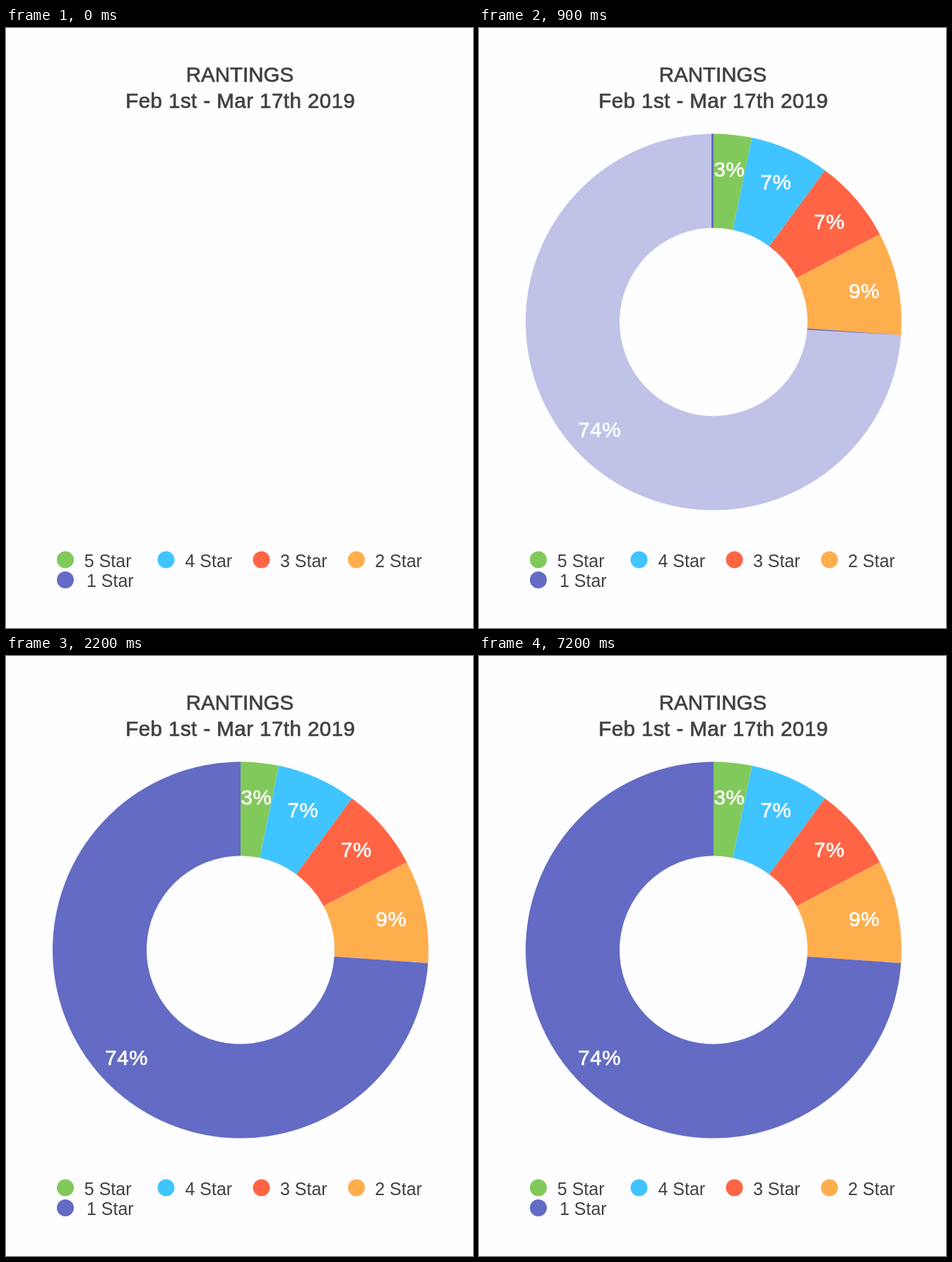
Animation, 661 px wide and 848 px high, one loop 7.3 s. Source, as an HTML page:

```html
<!DOCTYPE html>
<html lang="en">
<head>
<meta charset="utf-8">
<title>Rantings</title>
<style>
  html, body { margin: 0; width: 100%; height: 100%; overflow: hidden; background: #fefdff; }
  svg { display: block; width: 661px; height: 848px; }
  text { font-family: "Liberation Sans", Arial, sans-serif; fill: #424046; }
  .title, .share { font-size: 29.5px; text-anchor: middle; stroke-width: .7px; }
  .title { stroke: #424046; }
  .range { letter-spacing: .45px; }
  .share { fill: #fff; stroke: #fff; letter-spacing: .5px; }
  .legend { font-size: 25px; }
</style>
</head>
<body>
<svg viewBox="0 0 661 848" id="stage"></svg>
<script>
const LOOP = 7300;
const CENTER = { x: 332, y: 415.5 };
const OUTER = 266, INNER = 133;

// steps: [time in ms, opacity]
const slices = [
  { name: '5 Star', share: '3%', color: '#82c95b', from: 0, to: 11.8,
    label: [354.3, 209.5], dot: [84, 751.5], text: [110.8, 761.5], steps: [[500, 1]] },
  { name: '4 Star', share: '7%', color: '#40c4ff', from: 11.8, to: 36.35,
    label: [420.3, 228], dot: [226.5, 751.5], text: [253.5, 761.5], steps: [[600, 1]] },
  { name: '3 Star', share: '7%', color: '#ff6545', from: 36.35, to: 62.2,
    label: [495.8, 283.5], dot: [361.5, 751.5], text: [388, 761.5], steps: [[700, 1]] },
  { name: '2 Star', share: '9%', color: '#ffae4e', from: 62.2, to: 94,
    label: [545.4, 381.5], dot: [496, 751.5], text: [522.2, 761.5], steps: [[800, 1]] },
  { name: '1 Star', share: '74%', color: '#646bc4', from: 94, to: 360,
    label: [170.6, 577.5], dot: [84, 780], text: [114, 789.5], steps: [[900, .4], [1000, 1]] }
];

const stage = document.getElementById('stage');

function add(parent, tag, attrs, content = '') {
  const node = document.createElementNS('http://www.w3.org/2000/svg', tag);
  for (const key in attrs) node.setAttribute(key, attrs[key]);
  node.textContent = content;
  return parent.appendChild(node);
}

const addText = (parent, cls, [x, y], content) =>
  add(parent, 'text', { class: cls, x, y }, content);

// Angles run clockwise from twelve o'clock.
function polar(radius, degrees) {
  const a = degrees * Math.PI / 180;
  return `${CENTER.x + radius * Math.sin(a)} ${CENTER.y - radius * Math.cos(a)}`;
}

function wedge(from, to) {
  const large = to - from > 180 ? 1 : 0;
  return `M${polar(OUTER, from)} A${OUTER} ${OUTER} 0 ${large} 1 ${polar(OUTER, to)}
    L${polar(INNER, to)} A${INNER} ${INNER} 0 ${large} 0 ${polar(INNER, from)}Z`;
}

function play(node, steps) {
  const frames = [[0, 0], ...steps, [LOOP, steps[steps.length - 1][1]]]
    .map(([time, opacity]) => ({ offset: time / LOOP, opacity, easing: 'step-end' }));
  node.animate(frames, { duration: LOOP, iterations: Infinity });
}

addText(stage, 'title', [331, 76], 'RANTINGS');
addText(stage, 'title range', [331.8, 112.5], 'Feb 1st - Mar 17th 2019');

for (const s of slices) {
  const group = add(stage, 'g', {});
  add(group, 'path', { d: wedge(s.from, s.to), fill: s.color });
  addText(group, 'share', s.label, s.share);
  play(group, s.steps);

  add(stage, 'circle', { cx: s.dot[0], cy: s.dot[1], r: 12, fill: s.color });
  addText(stage, 'legend', s.text, s.name);
}

// Thin edges of the last slice that show before the slice itself.
const { color: edgeColor, from: edgeAngle } = slices[slices.length - 1];
const upperEdge = add(stage, 'path', { d: 'M329 149.5H332V282.5H329Z', fill: edgeColor });
const lowerEdge = add(stage, 'path', {
  d: `M${polar(INNER, edgeAngle)} L${polar(OUTER, edgeAngle)} L${polar(INNER, edgeAngle + .7)}Z`,
  fill: edgeColor
});
play(upperEdge, [[500, 1], [1000, 0]]);
play(lowerEdge, [[800, 1], [1000, 0]]);
</script>
</body>
</html>
```
